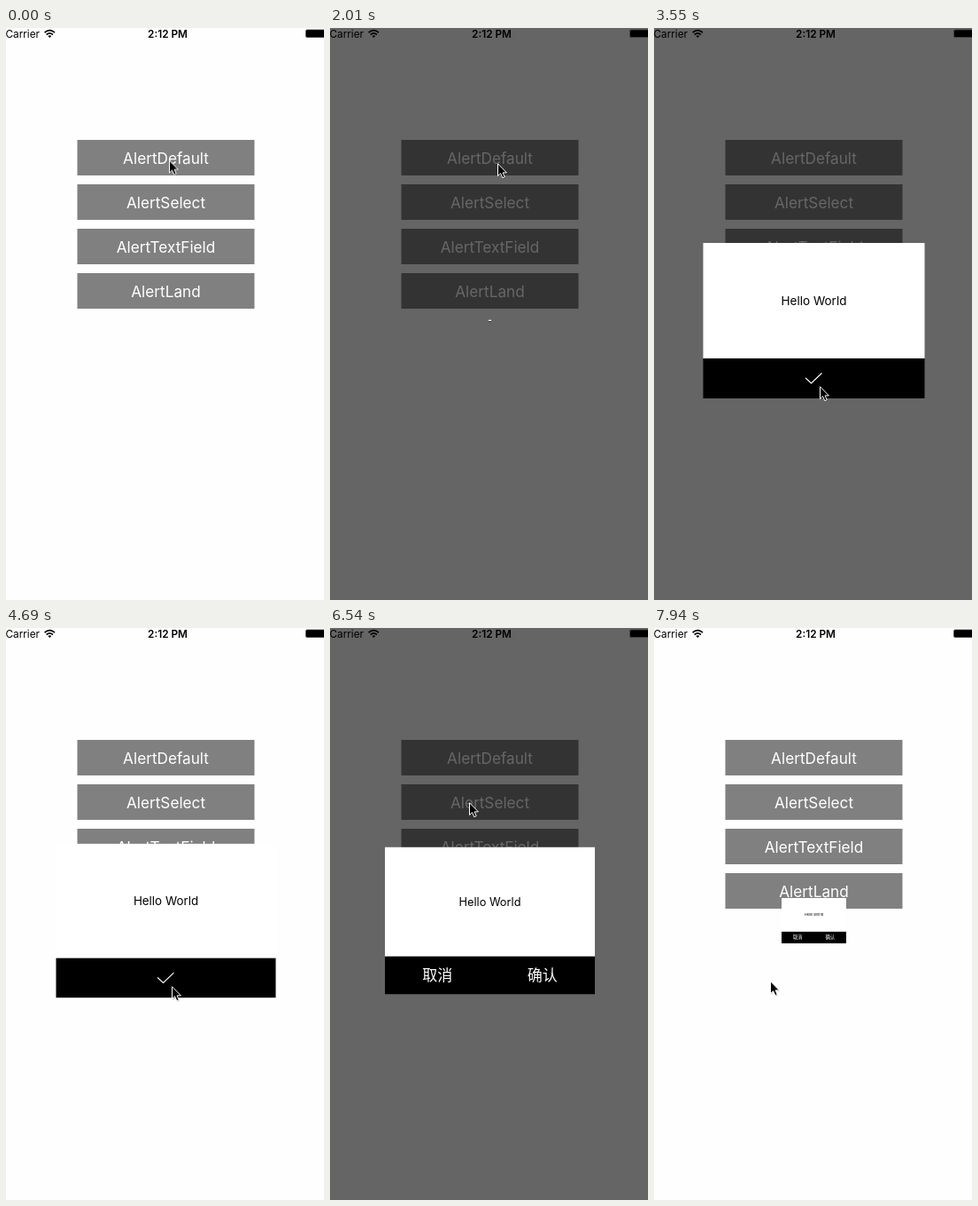
An HTML page for the animation above (7.99 s loop, 359x644 px).

```html
<!DOCTYPE html>
<html lang="en">
<head>
<meta charset="utf-8">
<title>Alert demo</title>
<style>
  html, body { margin: 0; width: 100%; height: 100%; overflow: hidden; background: #fefefe; }
  svg { display: block; width: 100%; height: 100%; }
  text { font-family: Inter, Roboto, "Noto Sans CJK SC", "Noto Sans CJK", sans-serif; text-anchor: middle; }
  .status { font-size: 11.8px; }
  .buttons rect { fill: #808080; }
  .buttons text { font-size: 17.2px; fill: #fff; }
  .message { font-size: 13.5px; }
  .action { font: 18px "Noto Sans CJK SC", "Noto Sans CJK", sans-serif; fill: #fff; }

  .dim, .alert, .cursor { animation: 7990ms linear infinite; }
  .dim { opacity: 0; animation-name: dim; animation-timing-function: step-end; }
  .alert { transform-origin: 180.5px 329.5px; }
  .first { animation-name: first; }
  .second { animation-name: second; }
  .cursor { animation-name: cursor; }

  @keyframes dim {
    0%, 57.94%, 97.49%, 100% { opacity: 0; }
    25.15%, 79.34% { opacity: .6; }
  }

  @keyframes first {
    0%, 25.07% { transform: scale(.01); visibility: hidden; }
    25.071% { transform: scale(.01); visibility: visible; animation-timing-function: ease-in-out; }
    28.2% { transform: scale(1); visibility: visible; }
    58.51% { transform: scale(1); visibility: visible; animation-timing-function: ease-in-out; }
    61.64% { transform: scale(.01); visibility: visible; }
    61.65%, 100% { transform: scale(.01); visibility: hidden; }
  }

  @keyframes second {
    0%, 79.237% { transform: scale(.01); visibility: hidden; }
    79.238% { transform: scale(.01); visibility: visible; animation-timing-function: ease-in-out; }
    82.37% { transform: scale(1); visibility: visible; }
    97.434% { transform: scale(1); visibility: visible; animation-timing-function: cubic-bezier(.439, 0, .702, .587); }
    99.374%, 100% { transform: scale(.292); visibility: visible; }
  }

  @keyframes cursor {
    0%, 7.76% { transform: translate(184px, 148.5px); }
    8.76% { transform: translate(182.5px, 151px); }
    10.64% { transform: translate(185px, 157px); }
    12.39%, 14.14% { transform: translate(187px, 155.5px); }
    16.15% { transform: translate(189px, 152px); }
    33.79% { transform: translate(189px, 152px); animation-timing-function: ease-in-out; }
    36.92% { transform: translate(195.5px, 420px); }
    37.8%, 42.43% { transform: translate(196px, 413px); }
    44.43% { transform: translate(187px, 403px); }
    65.46% { transform: translate(187px, 403px); animation-timing-function: ease-in-out; }
    70.34%, 73.59% { transform: translate(148px, 179px); }
    75.59% { transform: translate(157px, 196px); }
    83.1% { transform: translate(157px, 196px); animation-timing-function: ease-in-out; }
    88.99%, 89.4% { transform: translate(181px, 366px); animation-timing-function: ease-in-out; }
    94.62%, 100% { transform: translate(131px, 397px); }
  }
</style>
</head>
<body>
<svg viewBox="0 0 359 644">
  <defs>
    <g id="panel">
      <rect x="55.5" y="242" width="250" height="130" fill="#fff"/>
      <rect x="55.5" y="372" width="250" height="45"/>
      <text class="message" x="180.5" y="312">Hello World</text>
    </g>
  </defs>

  <rect width="359" height="644" fill="#fefefe"/>

  <g class="buttons">
    <rect x="80.5" y="126" width="200" height="40"/>
    <rect x="80.5" y="176" width="200" height="40"/>
    <rect x="80.5" y="226" width="200" height="40"/>
    <rect x="80.5" y="276" width="200" height="40"/>
    <text x="180.5" y="152.5">AlertDefault</text>
    <text x="180.5" y="202.5">AlertSelect</text>
    <text x="180.5" y="252.5">AlertTextField</text>
    <text x="180.5" y="302.5">AlertLand</text>
  </g>

  <rect class="dim" width="359" height="644"/>

  <g class="status">
    <text x="38" y="10.5" style="text-anchor: end">Carrier</text>
    <g fill="none" stroke="#000" stroke-width="1.7">
      <path d="M43.6 5.2Q49.3 0 55 5.2"/>
      <path d="M45.7 7.5Q49.3 4.3 52.9 7.5"/>
    </g>
    <path d="M47.3 9Q49.3 7.3 51.3 9L49.3 11Z"/>
    <text x="182.5" y="10.5" font-weight="600">2:12 PM</text>
    <rect x="338.5" y="2" width="26" height="8.5" rx="1.5" stroke="#444" stroke-width=".8"/>
  </g>

  <g class="alert first">
    <use href="#panel"/>
    <path d="M171 394L177.5 400L189.5 388.5" fill="none" stroke="#fff" stroke-width="1.1"/>
  </g>

  <g class="alert second">
    <use href="#panel"/>
    <text class="action" x="118" y="401">取消</text>
    <text class="action" x="243" y="401">确认</text>
  </g>

  <g class="cursor">
    <path d="M1 2V16L4.3 13L6.5 18L9 17L7 12.3H11.5Z" opacity=".18"/>
    <path d="M.5 .8V14.6L3.6 11.7L5.8 16.7L8.2 15.7L6.1 10.9H10.4Z" stroke="#fff"/>
  </g>
</svg>
</body>
</html>
```
